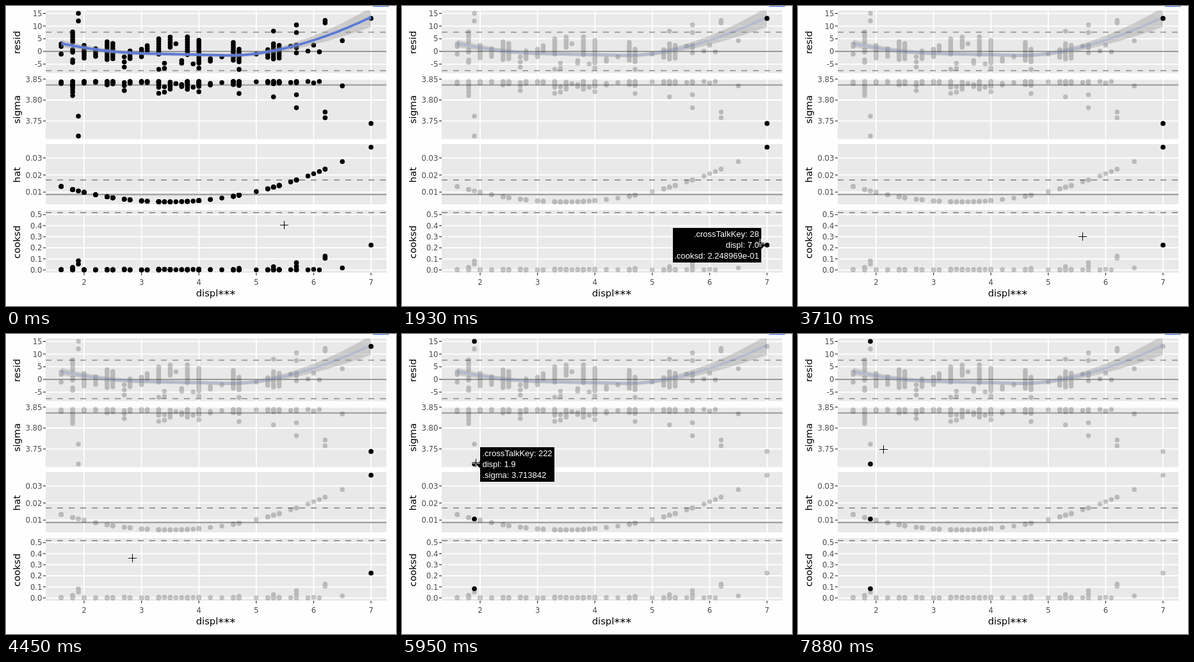
These frames come from a looping animation (609 by 469 pixels, 8 s). An HTML page:

```html
<!DOCTYPE html>
<html lang="en">
<head>
<meta charset="utf-8">
<title>Regression diagnostics</title>
<style>
  html, body { margin: 0; width: 100%; height: 100%; overflow: hidden; background: #fefefe; }
  svg { display: block; width: 609px; height: 469px; }
  text { font-family: "DejaVu Sans", Verdana, sans-serif; font-size: 11.7px; fill: #4d4d4d; }
  .title { font-size: 14.8px; fill: #000; text-anchor: middle; }
  .tip text { font: 13px "Liberation Sans", Arial, sans-serif; fill: #fff; }
</style>
</head>
<body>
<svg id="stage" viewBox="0 0 609 469"></svg>
<script>
const LOOP = 8000, STEP = 148.6;
const LEFT = 62, RIGHT = 594;
const xOf = d => 122 + (d - 2) * 89.6;

// Straight-line fit of highway mileage on engine size
const fit = d => 35.6977 - 3.5306 * d;

// Leave-one-out statistics of that fit
function diagnose(displ, hwy) {
  const n = 234, s2 = 3.836 ** 2;
  const resid = hwy - fit(displ);
  const hat = 1 / n + (displ - 3.4718) ** 2 / 388.9;
  const sigma = Math.sqrt((s2 * (n - 2) - resid ** 2 / (1 - hat)) / (n - 3));
  const cooksd = resid ** 2 * hat / (2 * s2 * (1 - hat) ** 2);
  return { displ, resid, sigma, hat, cooksd };
}

const points = [];
const addRun = (d, hi, lo = hi) => {
  for (let hwy = hi; hwy >= lo; hwy--) points.push(diagnose(d, hwy));
};

// Common sizes: broad columns, raised and widest around 3.5 litres
for (const d of [2, 2.4, 2.5, 3.3, 3.5, 3.8, 4, 4.6, 5.3, 5.4]) {
  const hi = 5.6 - 1.8 * Math.abs(d - 3.6);
  const lo = -3.1 + 4.6 * Math.exp(-(((d - 3.55) / .25) ** 2));
  addRun(d, Math.round(fit(d) + hi), Math.round(fit(d) + lo));
}
// Less common sizes: four neighbours, or one, near the fit
for (const d of [2.2, 2.8, 3, 4.7, 5.2]) addRun(d, Math.round(fit(d) + .6), Math.round(fit(d) + .6) - 3);
for (const d of [5.9, 6.1]) addRun(d, Math.round(fit(d)));
// Trucks share a few mileages
for (const d of [3.3, 3.4, 3.9, 4.2, 5, 6, 6.5]) addRun(d, 17);
for (const d of [3.7, 4.2, 4.4, 5.6]) addRun(d, 18);
for (const d of [3.4, 3.7]) addRun(d, 19);
// Striking cars; a-b is a falling run
const striking = "1.6: 33-32 29; 1.8: 37-33 30-29 26-25; 1.9: 44 41; 2.7: 24 22 20; 3.1: 27-25; 3.6: 26;"
  + "4: 18-17 15; 4.7: 16-15 12; 5.3: 25; 5.7: 26 23 18-17 15; 6.2: 26-25; 7: 24";
for (const row of striking.split(";")) {
  const [d, runs] = row.split(":");
  for (const run of runs.trim().split(" ")) addRun(+d, ...run.split("-").map(Number));
}

const panels = [
  { key: "resid", top: 7, bottom: 105, zero: 71, scale: 3.965, digits: 0,
    first: -5, step: 5, count: 5, solid: 0, dashed: [7.6, -7.6] },
  { key: "sigma", top: 113.5, bottom: 208, zero: 2632.2, scale: 654, digits: 2,
    first: 3.75, step: .05, count: 3, solid: 3.836, dashed: [] },
  { key: "hat", top: 216, bottom: 310, zero: 317.6, scale: 2670, digits: 2,
    first: .01, step: .01, count: 3, solid: 2 / 234, dashed: [4 / 234] },
  { key: "cooksd", top: 319, bottom: 417, zero: 412.6, scale: 173, digits: 1,
    first: 0, step: .1, count: 6, solid: null, dashed: [.518] }
];
const yOf = (panel, v) => panel.zero - v * panel.scale;

const hline = (y, stroke, width, extra = "") =>
  `<path d="M${LEFT},${y}H${RIGHT}" stroke="${stroke}" stroke-width="${width}" ${extra}/>`;

function drawPanel(p) {
  let out = `<rect x="${LEFT}" y="${p.top}" width="${RIGHT - LEFT}" height="${p.bottom - p.top}" fill="#e9e9e9"/>`;
  for (let d = 2; d <= 7; d++)
    out += `<path d="M${xOf(d)},${p.top}V${p.bottom}" stroke="#fff" stroke-width="1.8"/>`;
  for (let i = 0; i < p.count; i++) {
    const v = p.first + i * p.step, y = yOf(p, v);
    out += hline(y, "#fff", 1.8)
      + `<path d="M58,${y}H${LEFT}" stroke="#333" stroke-width="1.2"/>`
      + `<text x="56.5" y="${y + 4.3}" text-anchor="end">${v.toFixed(p.digits)}</text>`;
  }
  if (p.solid !== null) out += hline(yOf(p, p.solid), "#999", 1.9);
  for (const v of p.dashed) out += hline(yOf(p, v), "#999", 1.9, 'stroke-dasharray="9 9"');
  const mid = (p.top + p.bottom) / 2 + 1;
  return out + `<text class="title" transform="translate(21.5 ${mid}) rotate(-90)">${p.key}</text>`;
}

const dotsOf = pt => panels.map(p =>
  `<circle cx="${xOf(pt.displ)}" cy="${yOf(p, pt[p.key])}" r="3.8"/>`).join("");

// Smoother: a gentle slope that bends up at both ends, with a band that widens there
const above = v => Math.max(0, v);
const smooth = d => -.45 - .5 * (d - 2.3) + 1.45 * above(3.1 - d) ** 2 + 3.59 * above(d - 4.55) ** 1.69;
const band = d => .75 + .28 * above(3.1 - d) ** 2 + .6 * above(d - 4.7) ** 2;
const sizes = Array.from({ length: 109 }, (_, i) => 1.6 + i * .05);
const trace = (ds, f) => ds.map(d => `${xOf(d)},${yOf(panels[0], f(d))}`).join(" ");
const bandOutline = trace(sizes, d => smooth(d) + band(d)) + " "
  + trace([...sizes].reverse(), d => smooth(d) - band(d));

function tooltip(id, x, y, w, side, lines) {
  const h = 54, mid = y + h / 2, right = x + w;
  const edge = side > 0 ? right : x;
  const text = lines.map((s, i) =>
    `<text x="${edge - side * 3.5}" y="${mid - 13 + i * 16.9}" text-anchor="${side > 0 ? "end" : "start"}">${s}</text>`);
  return `<g class="tip" id="${id}"><rect x="${x}" y="${y}" width="${w}" height="${h}"/>
    <path d="M${edge},${mid - 6}l${side * 6},6l${-side * 6},6z"/>${text.join("")}</g>`;
}

let xAxis = "";
for (let d = 2; d <= 7; d++)
  xAxis += `<path d="M${xOf(d)},417v4" stroke="#333" stroke-width="1.2"/>
    <text x="${xOf(d)}" y="435.5" text-anchor="middle">${d}</text>`;

const plus = "M-6.5,0H6.5M0,-6.5V6.5";

document.getElementById("stage").innerHTML = `
  <clipPath id="clip"><rect x="${LEFT}" y="7" width="${RIGHT - LEFT}" height="98"/></clipPath>
  <path d="M573,.5h25" stroke="#3b6fd4"/>
  ${panels.map(drawPanel).join("")}${xAxis}
  <text class="title" x="327.5" y="454">displ<tspan font-size="18" dy="3">***</tspan></text>
  <g id="dots">${points.map(dotsOf).join("")}</g>
  <g clip-path="url(#clip)">
    <polyline id="trend" points="${trace(sizes, smooth)}" fill="none" stroke="#36f" stroke-width="3.8"/>
    <polygon points="${bandOutline}" fill="#999" fill-opacity=".4"/>
  </g>
  <g id="pickRight">${dotsOf(diagnose(7, 24))}</g>
  <g id="pickLeft">${dotsOf(diagnose(1.9, 44))}</g>
  ${tooltip("tipRight", 423, 347, 138, 1, [".crossTalkKey: 28", "displ: 7.0", ".cooksd: 2.248969e-01"])}
  ${tooltip("tipLeft", 122, 177, 116, -1, [".crossTalkKey: 222", "displ: 1.9", ".sigma: 3.713842"])}
  <g id="cross">
    <path d="${plus}" stroke="#fff" stroke-opacity=".75" stroke-width="3"/>
    <path d="${plus}" stroke="#000" stroke-width="1.1"/>
  </g>
  <path id="arrow" d="M0,0v15.5l3.5,-3.3l2.5,5.8l2.7,-1.1l-2.5,-5.6h4.8z" stroke="#fff"/>`;

const strokes = [
  { from: 2, to: 9, x: 559, y: 370, power: 1.5 },
  { from: 14, to: 18, x: 493, y: 362, power: 2 },
  { from: 24, to: 30, x: 197, y: 350, power: 1 },
  { from: 30, to: 32, x: 133.5, y: 212, power: 1 },
  { from: 32, to: 35, x: 115, y: 201, power: 2 },
  { from: 43, to: 47, x: 159, y: 193, power: 1 },
  { from: 49, to: 53, x: 133, y: 180, power: 1 }
];

function pointerAt(step) {
  let x = 434, y = 342;
  for (const s of strokes) {
    const u = Math.min(1, Math.max(0, (step - s.from) / (s.to - s.from)));
    const k = 1 - (1 - u) ** s.power;
    x += (s.x - x) * k;
    y += (s.y - y) * k;
  }
  return { x, y };
}

const node = id => document.getElementById(id);
const show = (id, on) => node(id).setAttribute("display", on ? "inline" : "none");

function render(t) {
  const step = Math.floor((t + 10) / STEP);
  const within = (from, to) => step >= from && step < to;
  const { x, y } = pointerAt(step);
  const opacity = step < 13 ? 1 : .2;
  node("dots").setAttribute("opacity", opacity);
  node("trend").setAttribute("opacity", opacity);
  show("pickRight", within(13, 40));
  show("pickLeft", step >= 40);
  show("tipRight", within(8, 15));
  show("tipLeft", within(34, 44));
  const inGap = y > 208 && y < 216;
  show("cross", !inGap);
  show("arrow", inGap);
  node("cross").setAttribute("transform", `translate(${Math.round(x) + .5} ${Math.round(y) + .5})`);
  node("arrow").setAttribute("transform", `translate(${x} ${y})`);
}

const start = performance.now();
function tick() {
  render((performance.now() - start) % LOOP);
  requestAnimationFrame(tick);
}
tick();
</script>
</body>
</html>
```
